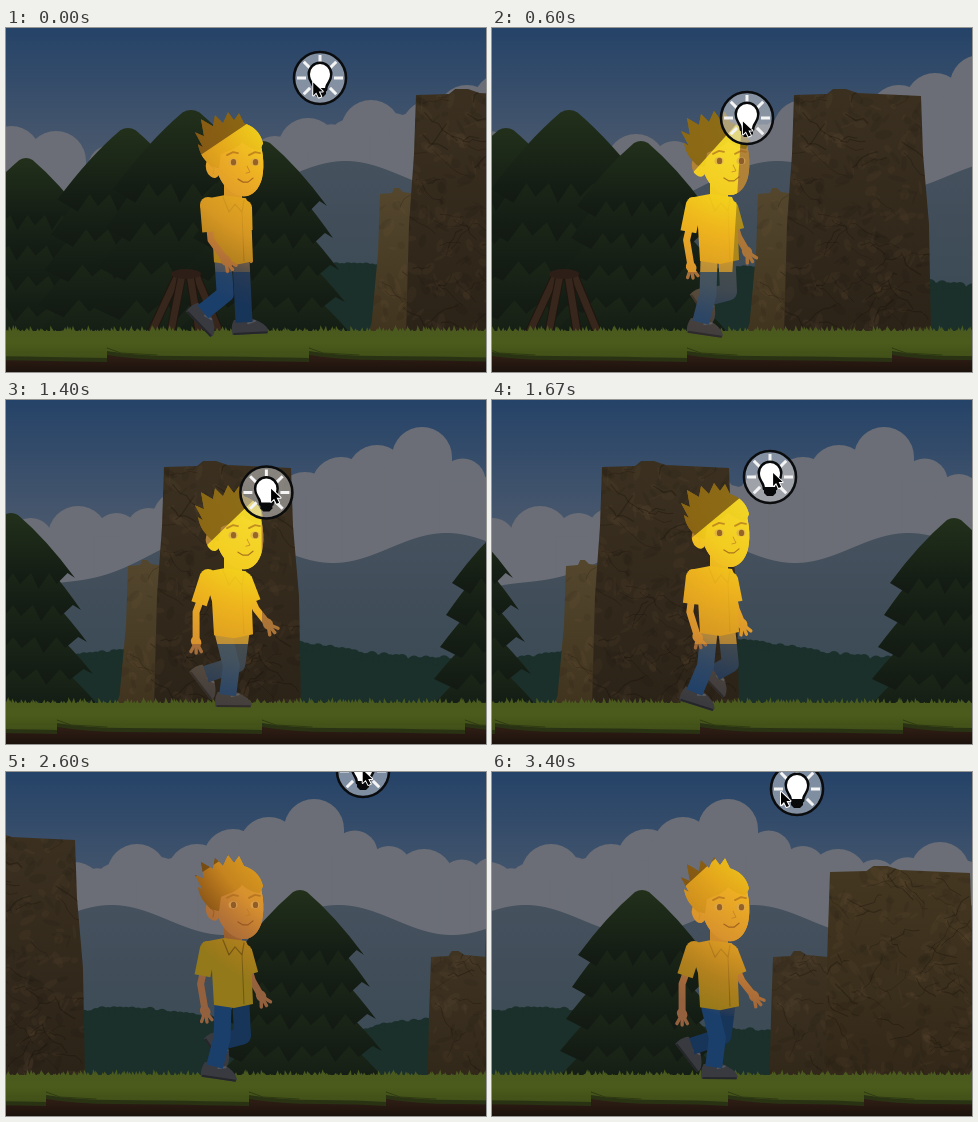
An HTML page with a canvas for the animation above (3470 ms loop, 480x344 px).

```html
<!DOCTYPE html>
<html lang="en">
<head>
<meta charset="utf-8">
<title>Night walk</title>
<style>
html, body { margin: 0; width: 480px; height: 344px; overflow: hidden; background: #26426a; }
canvas { display: block; }
</style>
</head>
<body>
<canvas id="stage" width="480" height="344"></canvas>
<script>
const W = 480, H = 344, LOOP = 3470, LAST = 51, TAU = Math.PI * 2;
const stage = document.getElementById('stage').getContext('2d');

let seed = 7;
const rnd = (a = 0, b = 1) => {
  seed = (seed * 16807) % 2147483647;
  return a + (b - a) * seed / 2147483647;
};

// Cosine wave with its crest at `crest`.
const wave = (x, crest, period) => Math.cos(TAU * (x - crest) / period);

function layer(width) {
  const c = document.createElement('canvas');
  c.width = width;
  c.height = H;
  return c.getContext('2d');
}

function vertical(c, y0, y1, ...colors) {
  const g = c.createLinearGradient(0, y0, 0, y1);
  colors.forEach((k, i) => g.addColorStop(i / (colors.length - 1), k));
  return g;
}

const poly = pts => new Path2D('M' + pts.join('L') + 'Z');

function fill(c, path, color) {
  c.fillStyle = color;
  c.fill(path);
}

function line(c, pts, width, color, cap = 'round') {
  c.beginPath();
  pts.forEach(p => c.lineTo(...p));
  Object.assign(c, { lineWidth: width, strokeStyle: color, lineCap: cap, lineJoin: 'round' });
  c.stroke();
}

function dot(c, x, y, rx, ry, color, angle = 0) {
  c.beginPath();
  c.ellipse(x, y, rx, ry, angle, 0, TAU);
  c.fillStyle = color;
  c.fill();
}

// ---- distant scenery ----
function makeFar() {
  const width = 800, c = layer(width), cloud = '#6b6e76';
  const puff = (x, top, r) => {
    dot(c, x, top + r, r, r, cloud);
    c.fillRect(x - r, top + r, 2 * r, 200);
  };
  const peaks = [[5, 98], [50, 103], [198, 106], [302, 90], [365, 72], [425, 72], [461, 57], [497, 45],
    [542, 27], [652, 77], [754, 70], [820, 85]];
  peaks.forEach(([x, top], i) => {
    puff(x, top, 30);
    const [nx, ny] = peaks[i + 1] || [x, top];
    for (const u of [.37, .68]) puff(x + (nx - x) * u, top + (ny - top) * u + 13, 23);
  });

  const hills = vertical(c, 130, 260, '#46515e', '#3c4b56');
  const ridge = x => 148 - 15 * wave(x, 339, 227) + Math.max(0, 300 - x) ** 2 / 480;
  c.fillStyle = hills;
  for (let x = 0; x < width; x++) c.fillRect(x, ridge(x), 1, H);
  for (let x = 0; x < width; x += 6) {
    const y = 248 - 11 * wave(x, 352, 400) + rnd(-2, 2);
    dot(c, x, y + 4, 6, 6, '#1b302a');
    c.fillRect(x - 5, y + 5, 10, 100);
  }
  return c.canvas;
}

// ---- near scenery ----
function tree(c, x, top, s) {
  c.save();
  c.translate(x, top);
  c.scale(s, s);
  for (let i = 4; i >= 0; i--) {
    const w = 64 + 6 * i, y1 = 65 + 32 * i, y0 = i ? y1 - 76 : 0, cy = y0 + (y1 - y0) * .4;
    c.beginPath();
    c.moveTo(-w, y1);
    c.quadraticCurveTo(-w * .55, cy, -7, y0 + 2);
    c.quadraticCurveTo(0, y0 - 2, 7, y0 + 2);
    c.quadraticCurveTo(w * .55, cy, w, y1);
    for (let k = 1; k < 7; k++) {
      const px = w * (1 - k / 3.5);
      c.lineTo(px + w * .17, y1 - 5);
      c.lineTo(px, y1 + (k % 2 ? 6 : 11));
    }
    c.closePath();
    c.fillStyle = vertical(c, y0, y1 + 8, i ? '#151e14' : '#22301b', '#1a2517', '#121a13');
    c.fill();
  }
  c.restore();
}

function rock(c, x0, x1, top, flare, light, dark) {
  const w = x1 - x0, area = w * (304 - top);
  c.save();
  c.clip(poly([[x0, top + 1], [x0 + w * .26, top], [x0 + w * .31, top - 5], [x0 + w * .41, top - 5],
    [x0 + w * .5, top - 1], [x1, top + 2], [x1 + 2, top + 60], [x1 + flare * .8, top + 130],
    [x1 + flare, 306], [x0 - flare, 306], [x0 - flare * .7, top + 130], [x0 - 2, top + 60]]));
  c.fillStyle = vertical(c, top, 304, light, dark);
  c.fillRect(x0 - flare, 0, w + 2 * flare, H);
  for (let i = area / 130; i > 0; i--) {
    let x = rnd(x0 - flare, x1 + flare), y = rnd(top, 304);
    dot(c, x, y, rnd(3, 10), rnd(1, 5), i % 2 < 1 ? '#8a784c10' : '#0a060312', rnd(0, 3));
    if (i % 4 > 1) continue;
    const crack = [[x, y]], slope = rnd(-6, 6);
    for (let k = 0; k < 5; k++) crack.push([x += rnd(1, 8), y += slope + rnd(-4, 4)]);
    line(c, crack, rnd(.5, 1.3), '#170f0755');
  }
  c.restore();
}

function campfire(c) {
  for (const [top, foot] of [[172, 146], [190, 213], [176, 165], [184, 193]]) {
    line(c, [[top, 247], [foot, 303]], 9, '#20160f');
    line(c, [[top, 247], [foot, 303]], 7, '#37261b');
  }
  dot(c, 180, 246, 15, 5, '#2d1e17');
}

function ground(c, width) {
  const grass = vertical(c, 298, 332, '#4a5a1f', '#4b5b1b', '#3e4e17');
  c.fillStyle = vertical(c, 330, H, '#2c1c13', '#1c120d');
  c.fillRect(0, 318, width, 30);
  c.fillStyle = grass;
  c.fillRect(0, 303, width, 20);
  for (let x = -2; x < width; x += 3)
    fill(c, poly([[x - 2, 305], [x + rnd(-2, 2), rnd(297, 303)], [x + 3, 305]]), grass);
  const breaks = [-100, 101, 303, 508, 711, 848, 984, 1180];
  breaks.slice(1).forEach((b, i) => {
    const a = breaks[i];
    for (const [color, d] of [['#2a3214', 4], [grass, 0]])
      fill(c, new Path2D(`M${a} 318V${323 + d}Q${a + 30} ${328 + d} ${a + 70} ${328 + d}
        T${b} ${330 + d}V318Z`), color);
    line(c, [[a, 320], [a + 14, 325], [a + 50, 327]], 1, '#2f3a12');
  });
}

function makeNear() {
  const width = W + 12 * LAST + 20, c = layer(width);
  tree(c, 20, 130, .95);
  tree(c, 122, 100, 1.1);
  tree(c, 185, 82, 1.22);
  tree(c, 257, 113, 1);
  tree(c, 762, 118, 1);
  campfire(c);
  rock(c, 374, 420, 165, 12, '#53462d', '#41341f');
  rock(c, 410, 537, 66, 10, '#3b3020', '#2c2318');
  rock(c, 893, 960, 184, 5, '#3f3322', '#32281a');
  rock(c, 950, 1090, 99, 6, '#443721', '#332819');
  ground(c, width);
  return c.canvas;
}

// ---- walker ----
const SKIN = '#94613f', SHIRT = '#94791a', PANTS = '#1b3f6b', SHOE = '#393a3f';
const face = new Path2D('M211 118L250 104C257 118 259 136 256 150C253 162 245 169 237 168C228 167 218 160 213 148Z');
const hair = new Path2D('M205 138C199 132 194 127 192 116L197 119L189 104L198 108L195 91L207 98L209 87L217 95' +
  'L222 84L228 92L233 85L238 95C247 98 254 103 257 115L254 122C247 122 241 118 236 114C230 122 220 123 215 126L213 140Z');
const shirt = new Path2D('M197 171L218 167L240 170L245 182L247 233L228 237L208 234L206 200Z');

function arm(c, shoulder, elbow, hand) {
  const [sx, sy] = shoulder, [ex, ey] = elbow, [hx, hy] = hand;
  line(c, [shoulder, elbow, hand], 7, SKIN);
  dot(c, hx, hy, 6, 5, SKIN, 1);
  const a = Math.atan2(hy - ey, hx - ex);
  for (const d of [-.5, 0, .5])
    line(c, [hand, [hx + 11 * Math.cos(a + d), hy + 11 * Math.sin(a + d)]], 3.4, SKIN);
  dot(c, sx, sy - 2, 8, 8, SHIRT);
  line(c, [[sx, sy - 3], [sx + (ex - sx) * .75, sy + (ey - sy) * .75]], 16, SHIRT, 'butt');
}

function leg(c, hip, knee, ankle, angle, color) {
  c.save();
  c.translate(...ankle);
  c.rotate(angle);
  fill(c, new Path2D('M-10 -3L7 -4Q22 2 24 9L23 12H-12Q-14 4 -10 -3Z'), SHOE);
  line(c, [[-11, 11], [23, 11]], 2, '#25262a', 'butt');
  line(c, [[4, 1], [11, -1]], 2, '#55565b');
  c.restore();
  line(c, [hip, knee, ankle], 17, color, 'butt');
}

function head(c) {
  line(c, [[227, 155], [227, 174]], 18, '#7d4f33', 'butt');
  dot(c, 207, 140, 7, 10, SKIN, -.3);
  line(c, [[205, 136], [208, 141], [207, 146]], 1.2, '#7a4a22');
  fill(c, face, SKIN);
  fill(c, hair, '#633f10');
}

function features(c) {
  c.globalAlpha = .65;
  for (const x of [227, 249]) {
    dot(c, x, 134, 4.5, 3.6, '#d9a860');
    dot(c, x + .5, 134, 2.6, 3.2, '#6b3a12');
    line(c, [[x - 6, 127], [x, 124], [x + 5, 125]], 1.8, '#a8671c');
  }
  line(c, [[241, 138], [244, 144], [240, 145]], 1, '#b9752a');
  line(c, [[232, 151], [237, 154], [242, 154], [247, 150]], 1.2, '#84451a');
  c.globalAlpha = 1;
}

function shine(c, bx, by) {
  const glow = c.createRadialGradient(bx, by, 0, bx, by, 240);
  [[0, '255,236,50,.97'], [.35, '255,218,28,.92'], [.5, '255,190,30,.85'], [.72, '246,166,38,.65'],
    [.85, '236,145,38,.3'], [1, '230,130,30,0']].forEach(([k, rgba]) => glow.addColorStop(k, `rgba(${rgba})`));
  c.save();
  c.globalCompositeOperation = 'source-atop';
  c.fillStyle = glow;
  c.globalAlpha = .28;
  c.fillRect(0, 0, W, H);
  // Full light falls in a wedge that opens from the lamp over face and torso.
  const lx = bx - 5, brow = 95 + by / 2;
  c.clip(poly([[lx, by], [410 - lx, 2 * brow - by], [-400, 244], [226 + (bx - 243) ** 2 / 10, 244]]));
  c.globalAlpha = .92;
  c.fillRect(0, 0, W, H);
  c.restore();
}

const body = layer(W);

function walker(step, bx, by) {
  const c = body, cycle = crest => wave(step, crest, 15), swing = cycle(13.8);
  c.clearRect(0, 0, W, H);
  arm(c, [238, 182], [244 - 6 * swing, 209], [250 - 12 * swing, 224]);
  leg(c, [235, 232], [235 + 5 * cycle(12), 264], [221 + 21 * cycle(13.5), 282 + 13 * cycle(.7)],
    .5 - .55 * cycle(.2), '#173459');
  leg(c, [217, 232], [220 + 8 * cycle(4), 266], [207 + 15 * cycle(5.5), 290 + 6 * cycle(7.3)],
    .4 - .42 * cycle(6.8), PANTS);
  c.save();
  c.translate(0, -1.2 * wave(step, 9.5, 7.5));
  head(c);
  fill(c, shirt, SHIRT);
  line(c, [[217, 169], [223, 184], [229, 176], [236, 184], [238, 172]], 1.2, '#5d4b10');
  line(c, [[236, 184], [238, 233]], 1, '#6b5814');
  fill(c, face, SKIN);
  fill(c, hair, '#633f10');
  c.restore();
  arm(c, [202, 179], [198 + 8 * swing, 212], [206 + 16 * swing, 237 - 5 * swing]);
  shine(c, bx, by);
  c.save();
  c.translate(0, -1.2 * wave(step, 9.5, 7.5));
  features(c);
  c.restore();
  stage.drawImage(c.canvas, 0, 0);
}

// ---- lamp and pointer ----
// step, x, y
const PATH = [[0, 314, 50], [9, 255, 90], [16, 243, 105], [25, 278, 77], [31, 297, 49], [39, 357, -1],
  [51, 305, 17], [52, 289, 20]];

// Smooth curve through the key points.
function lampAt(t) {
  const i = Math.max(0, PATH.findLastIndex((p, k) => p[0] <= t && k < PATH.length - 1));
  const a = PATH[i], b = PATH[i + 1], p = PATH[i - 1] || a, q = PATH[i + 2] || b;
  const dt = b[0] - a[0], u = (t - a[0]) / dt;
  return [1, 2].map(k => {
    const m0 = (b[k] - p[k]) / (b[0] - p[0]) * dt, m1 = (q[k] - a[k]) / (q[0] - a[0]) * dt;
    const d = b[k] - a[k];
    return a[k] + u * (m0 + u * (3 * d - 2 * m0 - m1 + u * (m0 + m1 - 2 * d)));
  });
}

const pointer = poly([[0, 0], [0, 13], [3, 10], [5.5, 15], [8, 14], [5.5, 9], [9.5, 9]]);
const bulb = new Path2D('M-5 11C-5 5 -10 3 -10 -4A10 10 0 0 1 10 -4C10 3 5 5 5 11Z');
const socket = new Path2D('M-6 10H6V16L3 19H-3L-6 16Z');

function outlined(c, path, width, stroke, color) {
  Object.assign(c, { lineWidth: width, strokeStyle: stroke });
  c.stroke(path);
  fill(c, path, color);
}

function lamp(x, y, px, py) {
  const c = stage;
  c.save();
  c.translate(x, y);
  dot(c, 0, 0, 26, 26, 'rgba(212,214,218,.5)');
  c.lineWidth = 2.6;
  c.strokeStyle = '#0b0c0e';
  c.stroke();
  for (let i = 0; i < 8; i++) {
    const u = Math.cos(i * TAU / 8), w = Math.sin(i * TAU / 8);
    if (i !== 2) line(c, [[u * 14, w * 14], [u * 23, w * 23]], 3, '#f4f4f4', 'butt');
  }
  outlined(c, bulb, 5, '#08090a', '#fff');
  fill(c, socket, '#08090a');
  c.translate(px - x, py - y);
  outlined(c, pointer, 2, '#fff', '#000');
  c.restore();
}

const far = makeFar(), near = makeNear();
const sky = vertical(stage, 0, 200, '#254368', '#42546c', '#59606c');

function draw(ms) {
  const step = Math.min(LAST, Math.floor(ms % LOOP * .015 + .06));
  const [x, y] = lampAt(step), [px, py] = lampAt(step + 1);
  stage.fillStyle = sky;
  stage.fillRect(0, 0, W, H);
  stage.drawImage(far, -6 * step, 0);
  stage.drawImage(near, -12 * step, 0);
  walker(step, x, y);
  lamp(x, y, px, py);
}

let start;
function tick(now) {
  start ??= now;
  draw(now - start);
  requestAnimationFrame(tick);
}
draw(0);
requestAnimationFrame(tick);
</script>
</body>
</html>
```
